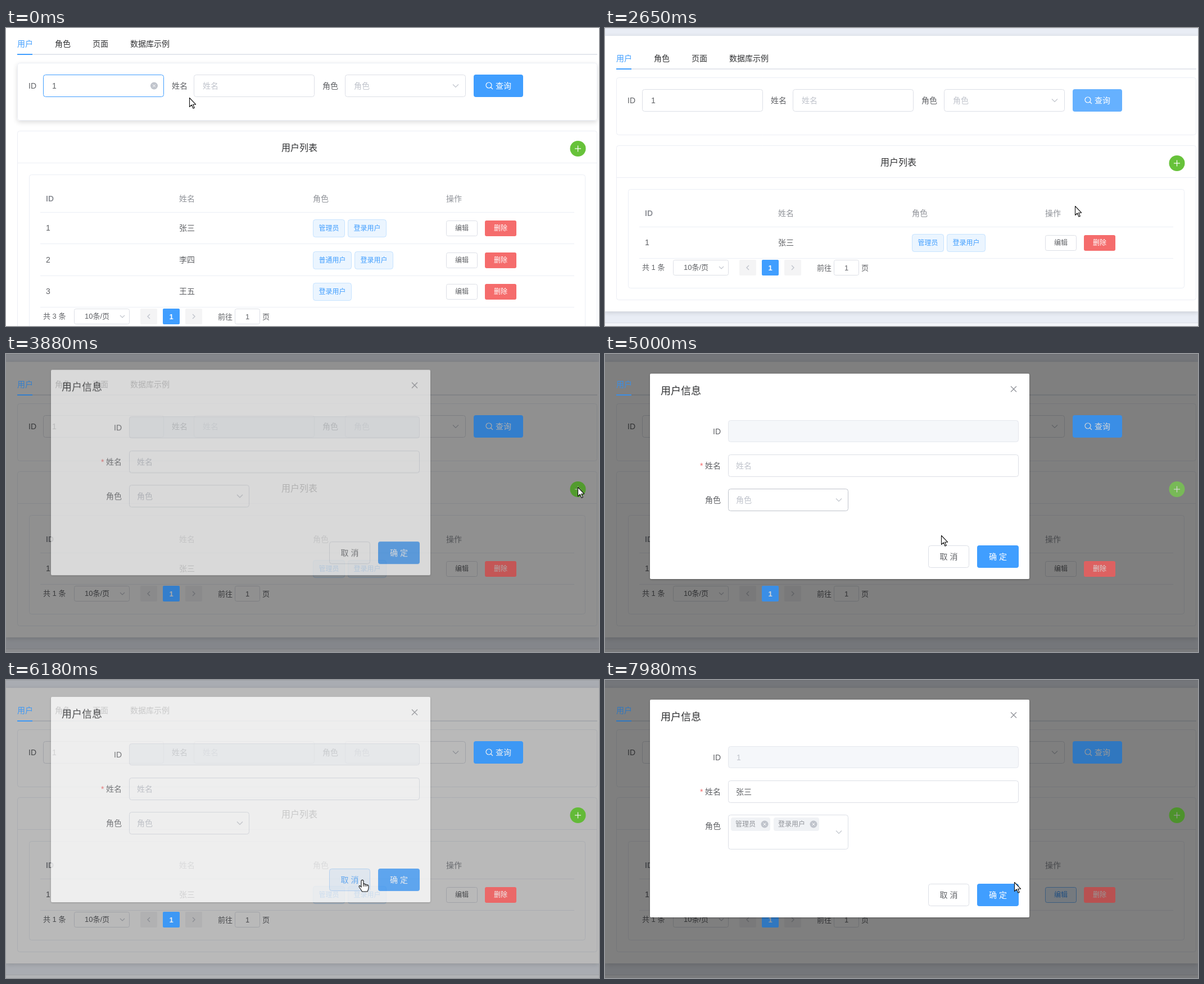
These frames come from a looping animation (1055x531 px, 8000 ms). An HTML page with a canvas:

```html
<!DOCTYPE html>
<html lang="zh-CN">
<head>
<meta charset="utf-8">
<title>用户列表</title>
<style>
html, body { margin: 0; width: 100%; height: 100%; overflow: hidden; background: #fff; }
canvas { display: block; }
</style>
</head>
<body>
<canvas id="stage" width="1055" height="531"></canvas>
<script>
const W = 1055, H = 531, LOOP = 8000;
const FONT = '"Liberation Sans", "Noto Sans CJK SC", "Noto Sans CJK", sans-serif';
const BLUE = '#409eff', TEXT = '#606266', DARK = '#303133', GRAY = '#909399';
const HINT = '#c0c4cc', EDGE = '#dcdfe6', LINE = '#ebeef5';

const screen = document.getElementById('stage').getContext('2d');
const layer = document.createElement('canvas');
layer.width = W;
layer.height = H;
const sheet = layer.getContext('2d');
let c = screen;

// Bursts of activity: start, end, number of steps
const bursts = [
  [120, 1140, 8], [1270, 1540, 3], [1840, 2230, 4], [2500, 3350, 7], [3610, 4570, 8],
  [4710, 5660, 8], [5940, 6870, 8], [7010, 7270, 2], [7560, 7980, 4]
];
const path = [
  [0, 326, 124], [120, 340, 122], [1000, 862, 114], [1840, 868, 114], [2230, 862, 255],
  [2500, 845, 292], [2642, 836, 317], [2800, 862, 322], [3220, 1006, 248], [3350, 1017, 237],
  [3884, 1017, 237], [4430, 440, 256], [4846, 425, 268], [4981, 598, 323], [5300, 632, 352],
  [5660, 634, 356], [6073, 634, 356], [6740, 790, 392], [6870, 806, 387], [7010, 808, 387],
  [7270, 812, 383], [7600, 812, 383], [7980, 728, 360]
];
const searchGlow = [[0, 1], [1840, 1], [2230, 0]];
const tableGlow = [[2640, 0], [2900, 1], [3060, 1], [3350, 0], [6400, 0], [6870, 1], [7600, 1], [7900, 0]];
const accentDim = [[3769, 0], [3884, .2], [4100, .1], [6019, .1], [6073, .04], [6220, 0], [7600, 0], [7800, .25]];

function snap(t) {
  let out = 0;
  for (const [a, b, n] of bursts) {
    if (t < a) break;
    const d = (b - a) / (n - 1);
    out = a + d * Math.min(n - 1, Math.floor((t - a + 15) / d));
  }
  return out;
}

function track(keys, t) {
  if (t <= keys[0][0]) return keys[0].slice(1);
  for (let i = 1; i < keys.length; i++) {
    const a = keys[i - 1], b = keys[i];
    if (t <= b[0]) {
      const k = (t - a[0]) / (b[0] - a[0]);
      return a.slice(1).map((v, j) => v + (b[j + 1] - v) * k);
    }
  }
  return keys[keys.length - 1].slice(1);
}

// The CSS "ease" curve
function ease(x) {
  if (x <= 0) return 0;
  if (x >= 1) return 1;
  let lo = 0, hi = 1, s;
  for (let i = 0; i < 20; i++) {
    s = (lo + hi) / 2;
    const bx = 3 * (1 - s) * (1 - s) * s * .25 + 3 * (1 - s) * s * s * .25 + s ** 3;
    if (bx < x) lo = s; else hi = s;
  }
  return 3 * (1 - s) * (1 - s) * s * .1 + 3 * (1 - s) * s * s + s ** 3;
}

function darken(hex, k) {
  const v = [1, 3, 5].map(i => Math.round(parseInt(hex.slice(i, i + 2), 16) * (1 - k)));
  return `rgb(${v})`;
}

function box(x, y, w, h, r, fill, edge) {
  c.beginPath();
  if (edge) c.roundRect(x + .5, y + .5, w - 1, h - 1, r);
  else c.roundRect(x, y, w, h, r);
  if (fill) { c.fillStyle = fill; c.fill(); }
  if (edge) { c.strokeStyle = edge; c.lineWidth = 1; c.stroke(); }
}

function rect(x, y, w, h, fill) {
  c.fillStyle = fill;
  c.fillRect(x, y, w, h);
}

function label(s, x, y, color = TEXT, size = 14, weight = 400, align = 'left') {
  c.font = `${weight} ${size}px ${FONT}`;
  c.textAlign = align;
  c.fillStyle = color;
  c.fillText(s, x, y);
}

function line(points, color, width = 1) {
  c.beginPath();
  points.forEach(([x, y]) => c.lineTo(x, y));
  c.strokeStyle = color;
  c.lineWidth = width;
  c.stroke();
}

function disc(x, y, r, fill) {
  c.beginPath();
  c.arc(x, y, r, 0, 7);
  c.fillStyle = fill;
  c.fill();
}

const down = (x, y, s = 5) => line([[x - s, y - s / 2], [x, y + s / 2], [x + s, y - s / 2]], HINT, 1.1);
const side = (x, y, d) => line([[x - 2 * d, y - 4], [x + 2 * d, y], [x - 2 * d, y + 4]], HINT, 1.4);

function cross(x, y, s, color, width = 1) {
  line([[x - s, y - s], [x + s, y + s]], color, width);
  line([[x + s, y - s], [x - s, y + s]], color, width);
}

function clearIcon(x, y) {
  disc(x, y, 6.5, HINT);
  cross(x, y, 2.4, '#fff');
}

function card(x, y, w, h, glow = 0) {
  if (glow > 0) {
    c.save();
    c.shadowColor = `rgba(0,0,0,${.14 * glow})`;
    c.shadowBlur = 8;
    c.shadowOffsetY = 3;
    box(x, y, w, h, 4, '#fff');
    c.restore();
  }
  box(x, y, w, h, 4, '#fff', LINE);
}

function tags(names, y) {
  let x = 546;
  for (const s of names) {
    const w = s.length * 12 + 21;
    box(x, y - 15, w, 32, 4, 'rgba(64,158,255,.1)', 'rgba(64,158,255,.25)');
    label(s, x + 10.5, y + 5, BLUE, 12);
    x += w + 5;
  }
}

const people = [
  ['张三', ['管理员', '登录用户']],
  ['李四', ['普通用户', '登录用户']],
  ['王五', ['登录用户']]
];

function page(st) {
  const { t, n, over } = st, extra = (n - 1) * 56.5;
  rect(0, 0, W, 720, '#e9edf5');
  rect(0, 0, W, 1, EDGE);
  if (n === 1) {
    rect(0, 525, W, 1, EDGE);
    rect(0, 526, W, 60, '#f4f6fa');
  }
  c.save();
  c.shadowColor = 'rgba(0,0,0,.14)';
  c.shadowBlur = 8;
  c.shadowOffsetY = 2;
  rect(0, 14, W, 491 + extra, '#fff');
  c.restore();

  ['角色', '页面', '数据库示例'].forEach((s, i) => label(s, 87 + 67 * i, 59, DARK));
  rect(20, 72, 1032, 2, '#e4e7ed');

  card(20, 88, 1032, 103, track(searchGlow, t)[0]);
  const focus = t < 1270;
  label('ID', 40, 134);
  box(66, 109, 215, 40, 4, '#fff', focus ? BLUE : EDGE);
  label('1', 82, 134);
  if (focus) {
    clearIcon(263.5, 129);
    if (t % 1000 >= 250 && t % 1000 < 750) rect(90, 121, 1, 16, DARK);
  }
  label('姓名', 295, 134);
  box(334, 109, 215, 40, 4, '#fff', EDGE);
  label('姓名', 350, 134, HINT);
  label('角色', 563, 134);
  box(603, 109, 215, 40, 4, '#fff', EDGE);
  label('角色', 619, 134, HINT);
  down(800, 129);

  card(20, 209, 1032, 276 + extra);
  rect(20, 266, 1032, 1, LINE);
  label('用户列表', 522, 244.5, DARK, 16, 500, 'center');
  card(41, 287, 990, 177 + extra, track(tableGlow, t)[0]);
  ['ID', '姓名', '角色', '操作'].forEach((s, i) =>
    label(s, Math.round(71 + 237.4 * i), 335, GRAY, 14, i ? 500 : 700));
  rect(61, 354, 950, 1, LINE);
  for (let i = 0; i < n; i++) {
    const y = Math.round(382 + 56.5 * i), [name, roles] = people[i];
    if (over(61, y - 27, 1011, y + 28)) rect(61, y - 27, 950, 56, '#f5f7fa');
    rect(61, y + 28, 950, 1, LINE);
    label(String(i + 1), 71, y + 5);
    label(name, 308, y + 5);
    tags(roles, y);
    const hot = over(783, y - 13, 838, y + 15) || (i === 0 && t >= 7560);
    box(783, y - 13, 56, 28, 3, hot ? '#ecf5ff' : '#fff', hot ? '#79bbff' : EDGE);
    label('编辑', 799, y + 5, hot ? BLUE : TEXT, 12);
  }

  const y = 427 + extra;
  label(`共 ${n} 条`, 66, y + 4, TEXT, 13);
  box(121, y - 14, 99, 28, 3, '#fff', EDGE);
  label('10条/页', 162, y + 4, TEXT, 13, 400, 'center');
  down(207, y, 4);
  box(239, y - 14, 30, 28, 2, '#f4f4f5');
  side(254, y, -1);
  box(319, y - 14, 30, 28, 2, '#f4f4f5');
  side(334, y, 1);
  label('前往', 377, y + 5, TEXT, 13);
  box(407, y - 14, 45, 28, 3, '#fff', EDGE);
  label('1', 429.5, y + 5, TEXT, 13, 400, 'center');
  label('页', 456, y + 5, TEXT, 13);
}

// Coloured controls keep more of their strength under the dark veil
function accents({ t, n, over }) {
  const k = track(accentDim, t)[0];
  const tone = hex => darken(hex, k), white = darken('#ffffff', k * 1.6);
  label('用户', 20, 59, tone(BLUE));
  rect(20, 72, 27, 2, tone(BLUE));

  const lit = over(832, 109, 920, 149) || (t > 1000 && t < 3600);
  box(832, 109, 88, 40, 4, tone(lit ? '#66b1ff' : BLUE));
  c.beginPath();
  c.arc(859, 128, 5, 0, 7);
  c.strokeStyle = white;
  c.lineWidth = 1.2;
  c.stroke();
  line([[862.5, 131.5], [866, 135]], white, 1.2);
  label('查询', 871, 134, white, 14, 500);

  const bright = over(1003, 227, 1031, 255) || (t > 3900 && t < 6019);
  disc(1017.5, 241, 14, tone(bright ? '#85ce61' : '#67c23a'));
  line([[1012, 241], [1023, 241]], white, 1.2);
  line([[1017.5, 235.5], [1017.5, 246.5]], white, 1.2);

  for (let i = 0; i < n; i++) {
    const y = Math.round(382 + 56.5 * i);
    box(852, y - 13, 56, 28, 3, tone('#f56c6c'));
    label('删除', 868, y + 5, white, 12);
  }
  const y = 427 + (n - 1) * 56.5;
  box(279, y - 14, 30, 28, 2, tone(BLUE));
  label('1', 294, y + 4.5, white, 13, 700, 'center');
}

function dialog({ t, x, y }) {
  const editing = t > 7500, grow = editing ? 22 : 0;
  c.save();
  c.shadowColor = 'rgba(0,0,0,.3)';
  c.shadowBlur = 3;
  c.shadowOffsetY = 1;
  box(80, 35, 675, 366 + grow, 2, '#fff');
  c.restore();
  label('用户信息', 99, 72, DARK, 18);
  cross(727, 62.5, 5, GRAY, 1.2);

  label('ID', 206, 142.5, TEXT, 14, 400, 'right');
  box(219, 118, 517, 39, 4, '#f5f7fa', '#e4e7ed');
  label('*', 169, 204, '#f56c6c');
  label('姓名', 206, 204, TEXT, 14, 400, 'right');
  box(219, 179, 517, 40, 4, '#fff', EDGE);
  label('角色', 206, 265, TEXT, 14, 400, 'right');
  const hot = t > 4300 && t < 5100;
  box(219, 240, 214, 40 + grow, 4, '#fff', hot ? HINT : EDGE);
  down(416, 260 + grow / 2);
  if (editing) {
    label('1', 234, 142.5, HINT);
    label('张三', 233, 204);
    [['管理员', 224, 70], ['登录用户', 300, 81]].forEach(([s, tx, w]) => {
      box(tx, 245, w, 24, 4, '#f0f2f5');
      label(s, tx + 8, 261, GRAY, 12);
      clearIcon(tx + w - 10, 257);
    });
  } else {
    label('姓名', 233, 204, HINT);
    label('角色', 233, 265, HINT);
  }

  const by = 341 + grow;
  const cancel = !editing && t < 6300 && x > 575 && x < 648 && y > by && y < by + 40;
  box(575, by, 73, 40, 4, cancel ? '#ecf5ff' : '#fff', cancel ? '#b3d8ff' : EDGE);
  label('取 消', 611.5, by + 25, cancel ? BLUE : TEXT, 14, 500, 'center');
  box(662, by, 74, 40, 4, BLUE);
  label('确 定', 699, by + 25, '#fff', 14, 500, 'center');
}

const ARROW = new Path2D('M.5 .5V16.5L4.2 13L7 19.2L9.3 18.2L6.6 12.2H11.6Z');
const HAND = new Path2D('M-2 1.5Q0-.8 2 1.5V7.5Q4 6.3 5 8.3Q7 7.3 8 9.3Q11 8.6 11 11.5V15Q10.5 18 9 21H-.5' +
  'Q-2.5 17-5.5 13.5Q-6.5 10.5-4.6 10.6Q-3 11.5-2 13.2Z');
const FINGERS = new Path2D('M2 7.5V12M5 8.3V12M8 9.3V12');

function pointer(x, y, hand) {
  c.save();
  c.translate(Math.round(x), Math.round(y));
  c.fillStyle = '#fff';
  c.strokeStyle = '#111';
  c.lineWidth = 1.1;
  c.lineJoin = 'round';
  c.fill(hand ? HAND : ARROW);
  c.stroke(hand ? HAND : ARROW);
  if (hand) c.stroke(FINGERS);
  c.restore();
}

function fade(t, ms) {
  if (t > 7500) return ease((t - 7600) / ms);
  return ease((t - 3769) / ms) - ease((t - 6019) / ms);
}

function draw(time) {
  const t = snap(time), [x, y] = track(path, t);
  const n = t < 1270 ? 3 : 1, top = n === 3 ? -26 : 0;
  const veil = .5 * fade(t, 200), shown = fade(t, 300);
  const inside = (a, b, p, q) => x >= a && x <= p && y >= b && y <= q;
  const over = (a, b, p, q) => veil <= 0 && inside(a, b + top, p, q + top);
  const st = { t, x, y, n, over };

  c = screen;
  rect(0, 0, W, H, '#fff');
  c.save();
  c.translate(0, top);
  page(st);
  c.restore();
  if (veil > 0) rect(0, 0, W, H, `rgba(0,0,0,${veil})`);
  c.save();
  c.translate(0, top);
  accents(st);
  c.restore();

  if (shown > 0) {
    c = sheet;
    c.clearRect(0, 0, W, H);
    dialog(st);
    c = screen;
    c.globalAlpha = shown;
    c.drawImage(layer, 0, -20 * (1 - shown));
    c.globalAlpha = 1;
  }

  const hand = shown > .7
    ? t < 7500 && (inside(219, 240, 433, 280) || inside(575, 341, 648, 381))
    : over(832, 109, 920, 149) || over(1003, 227, 1031, 255) || over(783, 369, 838, 397);
  pointer(x, y, hand);
}

const begin = performance.now();
function tick() {
  draw((performance.now() - begin) % LOOP);
  requestAnimationFrame(tick);
}
tick();
</script>
</body>
</html>
```
